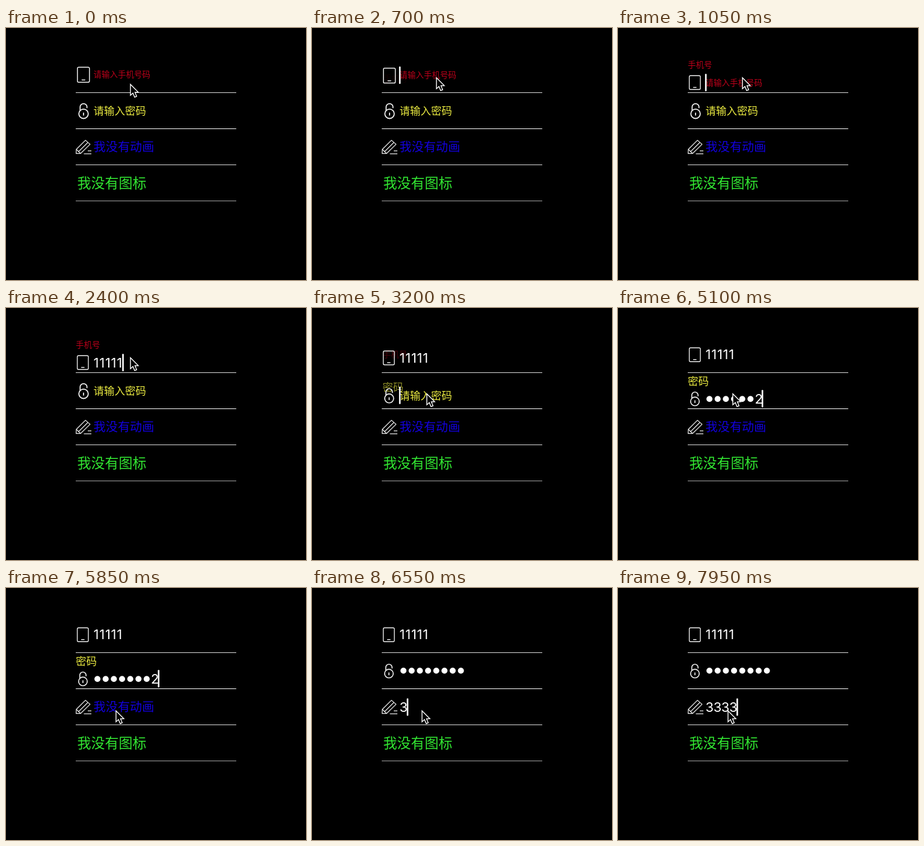
Write an HTML page with a canvas that moves like this. It is 499x419 px and loops after 8000 ms.

```html
<!DOCTYPE html>
<html lang="zh">
<head>
<meta charset="utf-8">
<style>
  html, body { margin: 0; width: 100%; height: 100%; overflow: hidden; background: #000; }
  canvas { display: block; }
</style>
</head>
<body>
<canvas id="stage" width="499" height="419"></canvas>
<script>
const ctx = document.getElementById('stage').getContext('2d');
const LOOP = 8000, MOVE = 300, TEXT_X = 145.5, BULLET = 13.65;
const CJK = '"Noto Sans CJK SC", "Noto Sans CJK", sans-serif';
const RED = '#bc001a', YELLOW = '#e8e840', BLUE = '#1200dc', GREEN = '#32e632';

const PHONE = { focus: 640, blur: 3030, firstKey: 1760, keyGap: 130, keys: 5 };
const SECRET = { focus: 3030, blur: 6000, firstKey: 3950, keyGap: 182, keys: 8 };
const NOTE = { focus: 6000, blur: Infinity, firstKey: 6430, keyGap: 240, keys: 4 };

// time, x, y of the pointer tip
const POINTER = [
  [0, 206.5, 93], [150, 206.5, 93], [550, 206.5, 82], [2550, 206.5, 82],
  [2920, 190.5, 142], [5350, 190.5, 142], [5780, 182.5, 203.5], [LOOP, 182.5, 203.5]
];

function ease(t, start, duration) {
  const p = Math.min(1, Math.max(0, (t - start) / duration));
  return p * p * (3 - 2 * p);
}

const lift = (f, t) => ease(t, f.focus, MOVE) - ease(t, f.blur, MOVE);
const isFocused = (f, t) => t >= f.focus && t < f.blur;
const typed = (f, t) => t < f.firstKey ? 0
  : Math.min(f.keys, 1 + Math.floor((t - f.firstKey) / f.keyGap));

function label(text, x, centerY, size, color, alpha = 1) {
  ctx.globalAlpha = alpha;
  ctx.font = `300 ${size}px ${CJK}`;
  ctx.fillStyle = color;
  ctx.fillText(text, x, centerY + size * 0.38);
  ctx.globalAlpha = 1;
}

function digits(text, x, centerY, tracking = '0px') {
  ctx.font = '400 22px Inter, sans-serif';
  ctx.letterSpacing = tracking;
  ctx.fillStyle = '#fff';
  ctx.fillText(text, x, centerY + 8);
  const { width } = ctx.measureText(text);
  ctx.letterSpacing = '0px';
  return width;
}

function caret(x, centerY) {
  ctx.fillStyle = '#fff';
  ctx.beginPath();
  ctx.roundRect(x - 1.3, centerY - 14.5, 2.6, 29, 1);
  ctx.fill();
}

function trace(points, closed) {
  ctx.beginPath();
  points.forEach(([x, y]) => ctx.lineTo(x, y));
  if (closed) ctx.closePath();
}

function polyline(points, closed) {
  trace(points, closed);
  ctx.stroke();
}

// Icons are drawn around their vertical centre, with x measured from the left edge.
function icon(draw, centerY, scale) {
  ctx.save();
  ctx.translate(116, centerY);
  ctx.scale(scale, scale);
  ctx.strokeStyle = '#eee';
  ctx.lineWidth = 1.5;
  ctx.lineJoin = 'round';
  draw();
  ctx.restore();
}

function phoneIcon() {
  ctx.beginPath();
  ctx.roundRect(2.8, -12.5, 20, 25, 2.2);
  ctx.stroke();
  polyline([[9.8, 8.6], [15.8, 8.6]]);
}

function lockIcon() {
  ctx.lineWidth = 1.8;
  ctx.beginPath();
  ctx.arc(13, 4.7, 7.8, 0, Math.PI * 2);
  ctx.stroke();
  ctx.beginPath();
  ctx.moveTo(7.3, -1);
  ctx.lineTo(7.3, -6.5);
  ctx.arc(13, -6.5, 5.7, Math.PI, Math.PI * 2.1);
  ctx.stroke();
  polyline([[13, 2.8], [13, 7.5]]);
}

function pencilIcon() {
  ctx.lineWidth = 1.25;
  polyline([[0.6, 10.7], [1, 3.7], [16.2, -11.4], [23.8, -4.6], [8, 10.7]], true);
  polyline([[1, 3.7], [8, 10.7]]);
  polyline([[5, 7.2], [20, -7.5]]);
  polyline([[20, 6.3], [26, 6.3]]);
  polyline([[13.5, 11.2], [26, 11.2]]);
}

function drawPhone(t) {
  const p = lift(PHONE, t), y = 77.3 + 13.7 * p, count = typed(PHONE, t);
  label('手机号', 116 + 3 * (1 - p), 87 - 26 * p, 13.5, RED, p);
  icon(phoneIcon, 77.8 + 13 * p, 1 - 0.08 * ease(t, PHONE.focus, MOVE));
  let width = 0;
  if (count) width = digits('1'.repeat(count), TEXT_X, y, '0.75px');
  else label('请输入手机号码', TEXT_X, y - 0.4, 13.5, RED);
  if (isFocused(PHONE, t)) caret(TEXT_X + 0.6 + width, y - 0.3);
}

function drawSecret(t) {
  const p = lift(SECRET, t), y = 137.5 + 13.7 * p, count = typed(SECRET, t);
  const focused = isFocused(SECRET, t), bullets = focused ? Math.max(0, count - 1) : count;
  label('密码', 116 + 3 * (1 - p), 147 - 26 * p, 17.5, YELLOW, p);
  icon(lockIcon, 138 + 13 * p, 1 - 0.08 * ease(t, SECRET.focus, MOVE));
  if (!count) label('请输入密码', TEXT_X, y, 17.5, YELLOW);
  ctx.fillStyle = '#fff';
  for (let i = 0; i < bullets; i++) {
    ctx.beginPath();
    ctx.arc(152.1 + i * BULLET, y, 5, 0, Math.PI * 2);
    ctx.fill();
  }
  if (!focused) return;
  const end = TEXT_X + bullets * BULLET;
  caret(count ? end + digits('2', end, y) - 0.6 : end + 0.6, y - 0.5);
}

function drawNote(t) {
  const count = typed(NOTE, t);
  icon(pencilIcon, 198, 1);
  let width = 0;
  if (count) width = digits('3'.repeat(count), TEXT_X, 198, '-0.45px');
  else label('我没有动画', TEXT_X, 197.5, 20.2, BLUE);
  if (isFocused(NOTE, t)) caret(TEXT_X + 0.3 + width, 198);
}

function drawPointer(t) {
  const i = POINTER.findIndex(k => k[0] > t);
  const [t0, x0, y0] = POINTER[i - 1], [t1, x1, y1] = POINTER[i];
  const p = ease(t, t0, t1 - t0);
  ctx.save();
  ctx.translate(x0 + (x1 - x0) * p, y0 + (y1 - y0) * p);
  ctx.strokeStyle = '#fff';
  ctx.lineWidth = 1.4;
  ctx.fillStyle = '#000';
  trace([[0.5, 0.8], [0.5, 19], [4.6, 15.2], [7.5, 22], [10.8, 20.6], [8, 14], [13.5, 13.8]], true);
  ctx.fill();
  ctx.stroke();
  ctx.restore();
}

function render(t) {
  ctx.fillStyle = '#000';
  ctx.fillRect(0, 0, 499, 419);
  ['#ddd', '#fff', '#ddd', '#a4a4a4'].forEach((color, i) => {
    ctx.fillStyle = color;
    ctx.fillRect(116, 107 + 60 * i, 267, 1);
  });
  drawPhone(t);
  drawSecret(t);
  drawNote(t);
  label('我没有图标', 118.5, 257.5, 23, GREEN);
  drawPointer(t);
}

const start = performance.now();
function tick() {
  render((performance.now() - start) % LOOP);
  requestAnimationFrame(tick);
}
tick();
</script>
</body>
</html>
```
